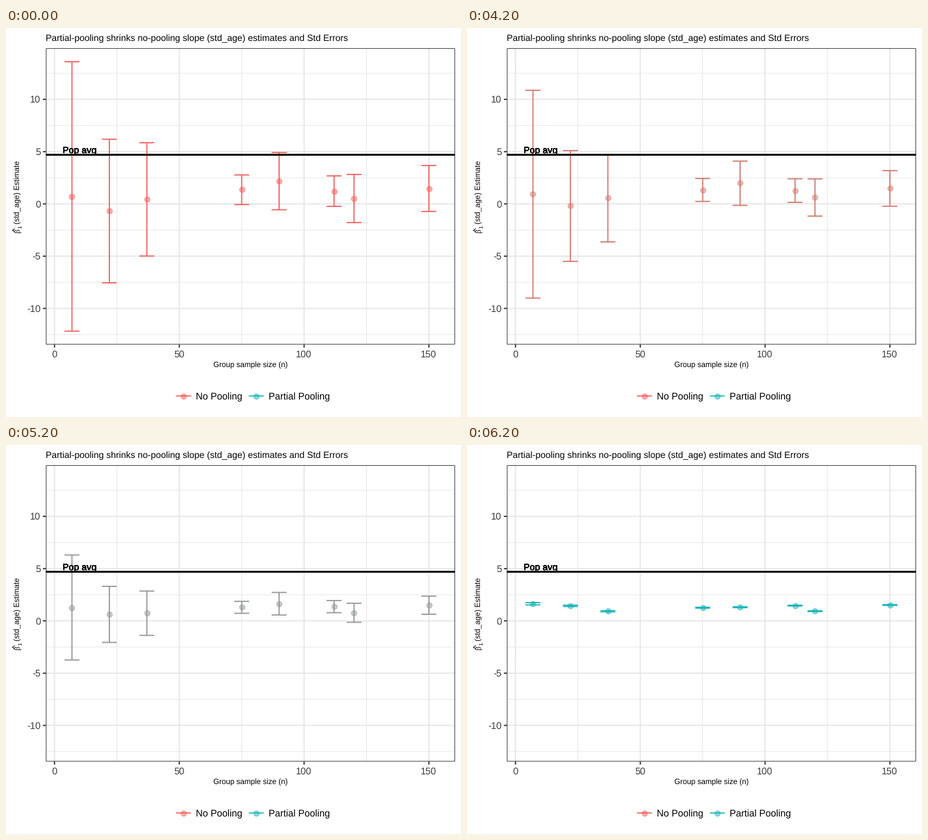
A matplotlib script that plays this animation: 700x600 px, repeating every 10000 ms.

```python
import numpy as np
import matplotlib.pyplot as plt
from matplotlib.animation import FuncAnimation
from matplotlib.collections import LineCollection
from matplotlib.patches import Rectangle

WIDTH, HEIGHT = 700, 600
LEFT, RIGHT, TOP, BOTTOM = 61.4, 690.8, 31.2, 488.3
FRAMES, INTERVAL = 100, 100
MOVE_START, MOVE_STEPS = 36, 26
LINE, THIN = 1.78, 0.89
ALPHA = 0.5
OVERPLOT = 8
GRID, AXIS, LABEL = "#e6e6e6", "#262626", "#3c3c3c"

plt.rcParams.update({
    "font.family": "Liberation Sans",
    "text.hinting": "none",
    "path.snap": False,
    "axes.unicode_minus": False,
})

# Group sizes, then estimates and interval half-widths without and with pooling
size = np.array([7, 22, 37, 75, 90, 112, 120, 150])
estimate = np.array([
    [0.715, -0.685, 0.435, 1.355, 2.175, 1.22, 0.515, 1.47],
    [1.64, 1.44, 0.92, 1.26, 1.31, 1.46, 0.935, 1.52],
])
half_width = np.array([
    [12.89, 6.87, 5.42, 1.417, 2.74, 1.458, 2.305, 2.2],
    [0.107, 0.067, 0.056, 0.04, 0.04, 0.035, 0.035, 0.035],
])

RGB_TO_XYZ = np.array([
    [0.4124, 0.3576, 0.1805],
    [0.2126, 0.7152, 0.0722],
    [0.0193, 0.1192, 0.9505],
])


def to_x(value):
    return 74.6 + 3.84 * value


def to_y(value):
    return 271.3 - 16.12 * value


def lerp(pair, t):
    return pair[0] + (pair[1] - pair[0]) * t


def lab_root(rgb):
    """Cube roots of XYZ, in which Lab is linear."""
    linear = ((np.array(rgb) / 255 + 0.055) / 1.055) ** 2.4
    linear[np.array(rgb) == 0] = 0
    return np.cbrt(RGB_TO_XYZ @ linear)


ROOTS = lab_root((248, 118, 109)), lab_root((0, 191, 196))


def pooling_color(t):
    """Blend in Lab, shown with a 1.8 gamma and slightly shifted primaries."""
    r, g, b = np.linalg.solve(RGB_TO_XYZ, lerp(ROOTS, t) ** 3)
    shown = np.array([r + 0.025 * (g - r), g + 0.02 * (g - r), b])
    return tuple(np.clip(shown, 0, 1) ** (1 / 1.8))


# One unit is one pixel, with y pointing down
fig = plt.figure(figsize=(WIDTH / 72, HEIGHT / 72), dpi=72, facecolor="white")
ax = fig.add_axes([0, 0, 1, 1])
ax.set(xlim=(0, WIDTH), ylim=(HEIGHT, 0))
ax.axis("off")


def stroke(xs, ys, color, width, z=1):
    ax.plot(xs, ys, color=color, lw=width, zorder=z,
            solid_capstyle="butt", snap=False)


def write(x, y, text, px, color="black", ha="left", z=6, **extra):
    ax.text(x, y, text, fontsize=px, color=color, ha=ha, va="baseline",
            zorder=z, rotation_mode="anchor", **extra)


def dots(xs, ys):
    return ax.plot(xs, ys, "o", ms=8.3, mew=1.18, zorder=4, snap=False)[0]


def paint_dots(artist, color):
    artist.set_color((*color, ALPHA))


def draw_panel():
    for x in (25, 75, 125):
        stroke([to_x(x)] * 2, [TOP, BOTTOM], GRID, THIN)
    for y in np.arange(-12.5, 13, 5):
        stroke([LEFT, RIGHT], [to_y(y)] * 2, GRID, THIN)
    for x in (0, 50, 100, 150):
        stroke([to_x(x)] * 2, [TOP, BOTTOM], GRID, LINE, 2)
        stroke([to_x(x)] * 2, [BOTTOM, BOTTOM + 4.6], AXIS, LINE, 2)
        write(to_x(x), 508, str(x), 14.67, LABEL, "center")
    for y in (-10, -5, 0, 5, 10):
        stroke([LEFT, RIGHT], [to_y(y)] * 2, GRID, LINE, 2)
        stroke([LEFT - 4.6, LEFT], [to_y(y)] * 2, AXIS, LINE, 2)
        write(53.1, to_y(y) + 5.2, str(y), 14.67, LABEL, "right")
    ax.add_patch(Rectangle((LEFT + 0.45, TOP + 0.45), RIGHT - LEFT - 0.9,
                           BOTTOM - TOP - 0.9, fill=False, ec=AXIS, lw=THIN,
                           zorder=7, snap=False))


def draw_titles():
    write(61.4, 20, "Partial-pooling shrinks no-pooling slope (std_age) "
          "estimates and Std Errors", 14)
    write(376.3, 524, "Group sample size (n)", 11.67, ha="center")
    write(22, 315.5, "β", 11.67, rotation=90, family="Liberation Serif")
    stroke([13.6, 9.8, 13.6], [314.6, 312, 309.4], "black", 1)
    write(24.2, 309.3, "1", 8.2, rotation=90)
    write(22, 302, "(std_age) Estimate", 11.67, rotation=90)


def draw_legend():
    for t, x, text_x, label in ((0, 273, 292.3, "No Pooling"),
                                (1, 385, 404.3, "Partial Pooling")):
        stroke([x - 11.5, x + 11.5], [567.5] * 2, pooling_color(t), LINE, 3)
        paint_dots(dots([x], [567.5]), pooling_color(t))
        write(text_x, 573, label, 14.67)


def draw_average():
    # Repeated drawing hardens the antialiased edges
    for _ in range(OVERPLOT):
        stroke([LEFT, RIGHT], [195.5] * 2, "black", LINE, 5)
        write(to_x(10), 192.8, "Pop avg", 14.2, ha="center")


draw_panel()
draw_titles()
draw_legend()
draw_average()
bars = LineCollection([], linewidths=LINE, capstyle="butt", zorder=3)
bars.set_snap(False)
ax.add_collection(bars, autolim=False)
points = dots(to_x(size), to_y(estimate[0]))


def update(frame):
    t = min(max((frame - MOVE_START) / MOVE_STEPS, 0), 1)
    mid, half = lerp(estimate, t), lerp(half_width, t)
    color = pooling_color(t)
    segments = []
    for x, low, high in zip(to_x(size), to_y(mid - half), to_y(mid + half)):
        segments.append([(x, low), (x, high)])
        segments += [[(x - 11.5, y), (x + 11.5, y)] for y in (low, high)]
    bars.set_segments(segments)
    bars.set_color(color)
    points.set_ydata(to_y(mid))
    paint_dots(points, color)
    return bars, points


anim = FuncAnimation(fig, update, frames=FRAMES, interval=INTERVAL,
                     init_func=lambda: update(0), repeat=True, repeat_delay=0)
plt.show()
```
